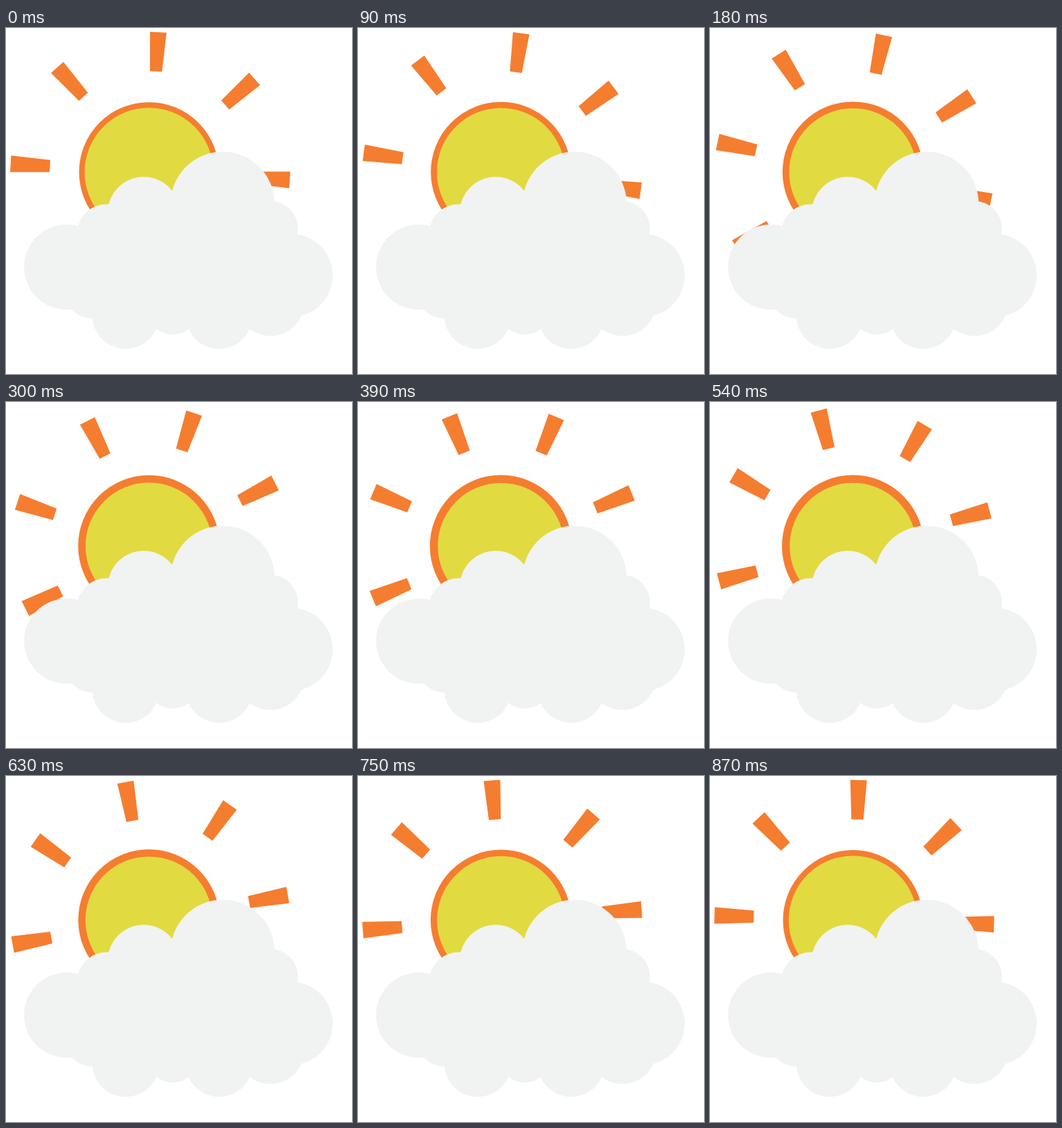
Recreate the animation shown at these times as an HTML page with a canvas. Size 500 by 500 pixels, loop 0.9 s.

```html
<!DOCTYPE html>
<html lang="en">
<head>
<meta charset="utf-8">
<title>Sun behind a cloud</title>
<style>
  html, body { margin: 0; width: 100%; height: 100%; overflow: hidden; background: #fff; }
  canvas { display: block; width: 500px; height: 500px; }
</style>
</head>
<body>
<canvas id="stage" width="500" height="500"></canvas>
<script>
const ctx = document.getElementById('stage').getContext('2d');
const LOOP = 900, STEP = 30;
const ORANGE = '#f57d30', YELLOW = '#e1da41', CLOUD = '#f1f2f2';

function circle(x, y, r) {
  ctx.beginPath();
  ctx.arc(x, y, r, 0, 2 * Math.PI);
}

function puff(x, y, r) {
  circle(x, y, r);
  ctx.fill();
}

function drawRays(degrees) {
  ctx.save();
  ctx.translate(208.4, 207.8);
  ctx.rotate(degrees * Math.PI / 180);
  ctx.fillStyle = ORANGE;
  for (let i = 0; i < 8; i++) {
    ctx.beginPath();
    ctx.moveTo(-12, -202);
    ctx.lineTo(12, -202);
    ctx.lineTo(8.7, -145.2);
    ctx.lineTo(-8.7, -145.2);
    ctx.fill();
    ctx.rotate(Math.PI / 4);
  }
  ctx.restore();
}

function drawSun(rim) {
  circle(206.6, 208.2, 97);
  ctx.fillStyle = YELLOW;
  ctx.fill();
  ctx.strokeStyle = ORANGE;
  ctx.lineWidth = rim;
  ctx.stroke();
}

// Left and right puffs come in pairs that differ a little in height and size.
function drawCloud() {
  ctx.fillStyle = CLOUD;
  for (const side of [-1, 1]) {
    puff(256 + 57 * side, 260.5 - 6.5 * side, 63.6 + 11.6 * side);
    puff(264 + 118 * side, 294 - 4 * side, 41.8 - 1.8 * side);
    puff(249.8 + 162.2 * side, 351.5 + 6 * side, 60.8 - 0.7 * side);
    puff(253.5 + 128.5 * side, 388 + 8 * side, 44.5 + 4.5 * side);
    puff(240.5 + 67.5 * side, 415.5, 48.2);
  }
  puff(241, 406, 37);
  ctx.fillRect(120, 270, 270, 130);
}

function draw(ms) {
  const t = Math.floor((ms % LOOP) / STEP) * STEP / LOOP;
  ctx.fillStyle = '#fff';
  ctx.fillRect(0, 0, 500, 500);
  drawRays(3.3 + 45 * t);
  drawSun(12 - 4 * Math.abs(1 - 2 * t));
  drawCloud();
}

let start;
function tick(now) {
  start ??= now;
  draw(now - start);
  requestAnimationFrame(tick);
}
draw(0);
requestAnimationFrame(tick);
</script>
</body>
</html>
```
